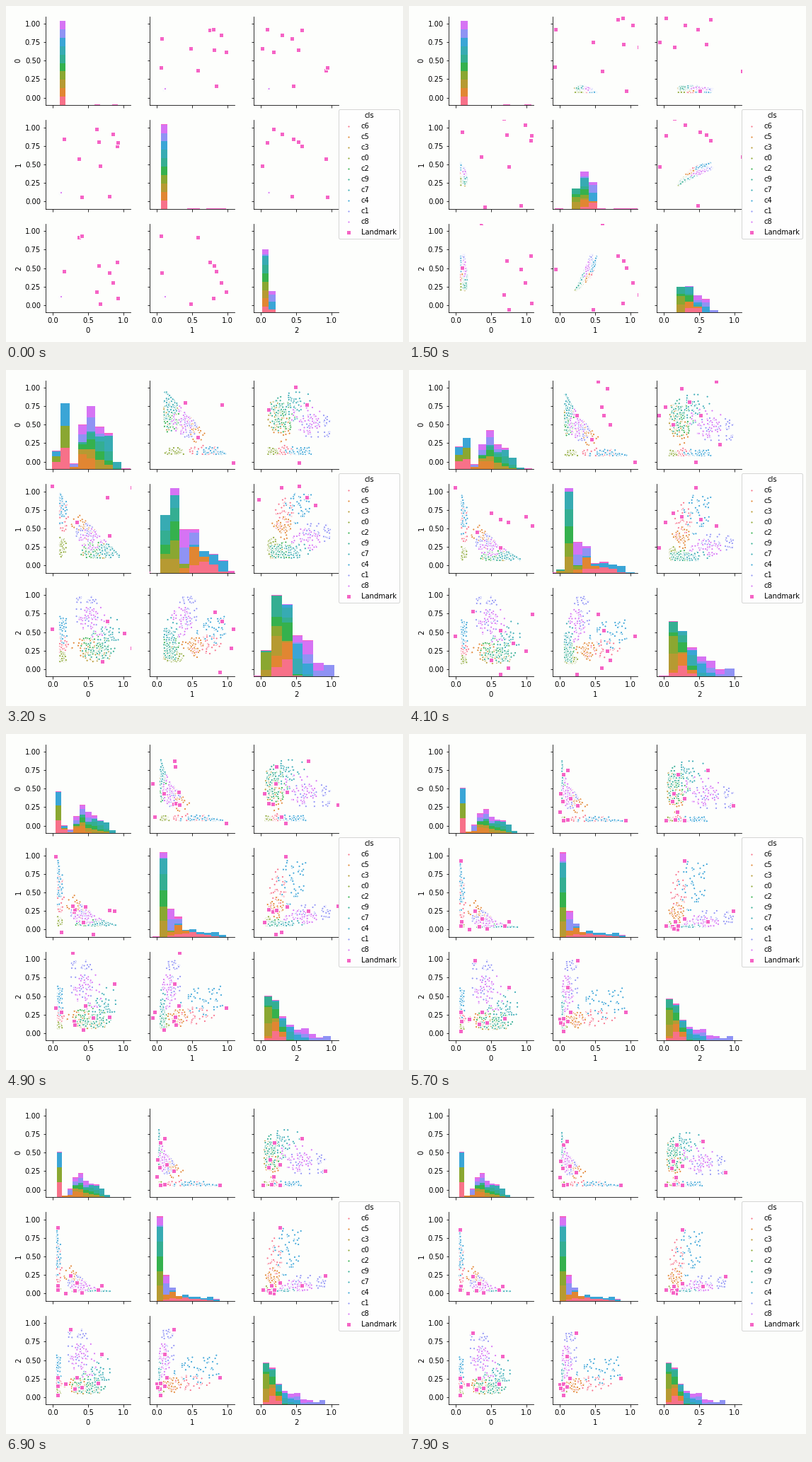
These frames come from a looping animation (561 by 475 pixels, 8 s). A matplotlib script:

```python
import matplotlib.pyplot as plt
import numpy as np
from matplotlib.animation import FuncAnimation
from matplotlib.collections import PolyCollection

W, H, DPI = 561, 475, 72
FRAMES, STEP = 80, 100
LEFT, PITCH_X, AX_W = 56.1, 147.1, 119.7
BASE, PITCH_Y, AX_H = 41.7, 146.6, 125.5
LO, HI = -0.1, 1.1
BG = "#fdfefc"
PER_CLASS, BINS = 48, 10

COLORS = ["#f77189", "#e18632", "#b69a32", "#8aa731", "#35b14d", "#34ae92",
          "#37abb3", "#3aa5d6", "#8f93f4", "#d673f4", "#f564c5"]
CENTRES = {
    "c6": (0.12, 0.68, 0.33), "c5": (0.45, 0.55, 0.30),
    "c3": (0.60, 0.20, 0.20), "c0": (0.10, 0.25, 0.15),
    "c2": (0.60, 0.20, 0.35), "c9": (0.65, 0.20, 0.25),
    "c7": (0.80, 0.20, 0.50), "c4": (0.12, 0.82, 0.55),
    "c1": (0.50, 0.45, 0.82), "c8": (0.60, 0.35, 0.65),
}
NAMES = [*CENTRES, "Landmark"]

# Where each landmark starts and where it comes to rest
MARKS = np.array([
    [(0.16, 0.84, 0.46), (0.07, 0.93, 0.29)],
    [(0.62, 0.98, 0.18), (0.19, 0.00, 0.19)],
    [(0.85, 0.91, 0.30), (0.69, 0.05, 0.20)],
    [(0.65, 0.81, 0.53), (0.37, 0.15, 0.29)],
    [(0.91, 0.75, 0.58), (0.75, 0.11, 0.62)],
    [(0.92, 0.80, 0.09), (0.08, 0.11, 0.16)],
    [(0.37, 0.58, 0.92), (0.27, 0.25, 0.98)],
    [(0.67, 0.48, 0.02), (0.33, 0.04, 0.12)],
    [(0.41, 0.06, 0.94), (0.07, 0.05, 0.03)],
    [(0.80, 0.07, 0.44), (0.44, 0.01, 0.14)],
])
START, HOME = MARKS.swapaxes(0, 1)
SHRINK = np.array([0.88, 0.93, 0.89])
SETTLED, END = 5.7, 7.9


def ramp(t, t0, t1):
    return np.clip((t - t0) / (t1 - t0), 0, 1)


def fold(x, lo, hi):
    """Reflect values back into lo..hi."""
    x = lo + np.abs(x - lo)
    return hi - np.abs(hi - x)


def wide_cloud(rng):
    """One ball of points per class, folded into a rounded wedge."""
    mid = np.repeat(list(CENTRES.values()), PER_CLASS, axis=0)
    ball = rng.normal(size=mid.shape)
    ball /= np.linalg.norm(ball, axis=1, keepdims=True)
    ball *= rng.random((len(mid), 1)) ** (1 / 3)
    p = fold(mid + ball * (0.07 + 0.27 * mid), 0.1, 0.98)
    over = np.maximum(p[:, 0] + p[:, 1] - 1.08, 0)
    p[:, :2] -= over[:, None]
    return fold(p, 0.1, 0.98)


def make_clouds():
    wide = wide_cloud(np.random.default_rng(4))
    a, b, c = wide.T
    s = np.clip(0.55 * b + 0.6 * c - 0.05, 0, 1)
    seed = np.column_stack([0.097 + 0.032 * s + 0.004 * a,
                            0.097 + 0.032 * s + 0.004 * b,
                            0.1 + 0.021 * s])
    bud = np.column_stack([0.06 + 0.11 * a,
                           0.08 + 0.45 * np.sqrt(s) + 0.06 * (b - c),
                           0.145 + 0.6 * s - 0.12 * (b - c)])
    # Powers above one pull the wedge into thin arms along the axes
    unit = (wide - 0.1) / 0.88
    tight = [0.06, 0.03, 0.05] + [0.86, 0.91, 0.93] * unit ** [1.2, 2.2, 1.4]
    return [seed, bud, wide, tight, tight * SHRINK]


TIMES = [0, 1.5, 3.2, SETTLED, END]
EASE = [2, 1, 0.75, 0.8]
CLOUDS = make_clouds()


def points_at(t):
    k = min(np.searchsorted(TIMES, t, side="right") - 1, len(EASE) - 1)
    f = ramp(t, TIMES[k], TIMES[k + 1]) ** EASE[k]
    return CLOUDS[k] + (CLOUDS[k + 1] - CLOUDS[k]) * f


def marks_at(t):
    """Landmarks drift outwards, then are drawn home and shrink with the cloud."""
    drift = START + (START - [0.4, 0.5, 0.3]) * 0.18 * t ** 1.25
    p = ramp(t, 2.4, SETTLED)
    p = p * p * (3 - 2 * p)
    settle = 1 + (SHRINK - 1) * ramp(t, SETTLED, END) ** EASE[-1]
    return drift * (1 - p) + HOME * settle * p


def make_axes(fig, r, c):
    box = [(LEFT + c * PITCH_X) / W, (BASE + (2 - r) * PITCH_Y) / H, AX_W / W, AX_H / H]
    ax = fig.add_axes(box, facecolor="none")
    ax.set(xticks=[0, 0.5, 1], yticks=[0, 0.25, 0.5, 0.75, 1])
    ax.spines[["top", "right"]].set_visible(False)
    ax.tick_params(labelleft=c == 0, labelbottom=r == 2)
    if c == 0:
        ax.set_ylabel(str(r))
    if r == 2:
        ax.set_xlabel(str(c))
    return ax


def dots(ax, n, color, marker, **kw):
    xy = np.full(n, -9.0)
    return ax.scatter(xy, xy, s=40, c=color, marker=marker,
                      edgecolors="w", linewidths=1, **kw)


plt.rcParams.update({"font.family": "DejaVu Sans", "font.size": 10})
fig = plt.figure(figsize=(W / DPI, H / DPI), dpi=DPI, facecolor=BG)

POINT_COLORS = np.repeat(COLORS[:-1], PER_CLASS)
BAR_COLORS = np.repeat(COLORS, BINS)
scatters, bars = [], []
for r in range(3):
    for c in range(3):
        ax = make_axes(fig, r, c)
        if r == c:
            poly = PolyCollection([], edgecolors="none", linewidths=0,
                                  antialiaseds=False, zorder=3)
            ax.add_collection(poly, autolim=False)
            bars.append(poly)
        else:
            scatters.append((c, r, dots(ax, len(POINT_COLORS), POINT_COLORS, "."),
                             dots(ax, len(START), COLORS[-1], "s")))
        ax.set(xlim=(LO, HI), ylim=(LO, HI))

keys = [dots(ax, 1, col, "s" if name == "Landmark" else ".", label=name)
        for name, col in zip(NAMES, COLORS)]
fig.legend(handles=keys, title="cls", loc="center right")


def stack(values, marks):
    """Bin edges and cumulative counts over the classes and landmarks."""
    groups = [*values.reshape(-1, PER_CLASS), marks]
    every = np.concatenate(groups)
    edges = np.linspace(every.min(), every.max(), BINS + 1)
    counts = [np.histogram(g, edges)[0] for g in groups]
    return edges, np.vstack([np.zeros(BINS), np.cumsum(counts, axis=0)])


def draw(i):
    t = i * STEP / 1000
    pts, marks = points_at(t), marks_at(t)
    for x, y, small, square in scatters:
        small.set_offsets(pts[:, [x, y]])
        square.set_offsets(marks[:, [x, y]])

    hists = [stack(pts[:, k], marks[:, k]) for k in range(3)]
    top = 1.05 * max(h.max() for _, h in hists)
    for poly, (edges, h) in zip(bars, hists):
        y = LO + (HI - LO) * h / top
        y0, y1 = y[:-1].ravel(), y[1:].ravel()
        x0, x1 = np.tile(edges[:-1], len(COLORS)), np.tile(edges[1:], len(COLORS))
        quads = np.stack([x0, y0, x1, y0, x1, y1, x0, y1], axis=1).reshape(-1, 4, 2)
        full = y1 > y0
        poly.set_verts(quads[full])
        poly.set_facecolor(BAR_COLORS[full])
    return []


anim = FuncAnimation(fig, draw, frames=FRAMES, interval=STEP,
                     init_func=lambda: draw(0), repeat=True, repeat_delay=0)
plt.show()
```
